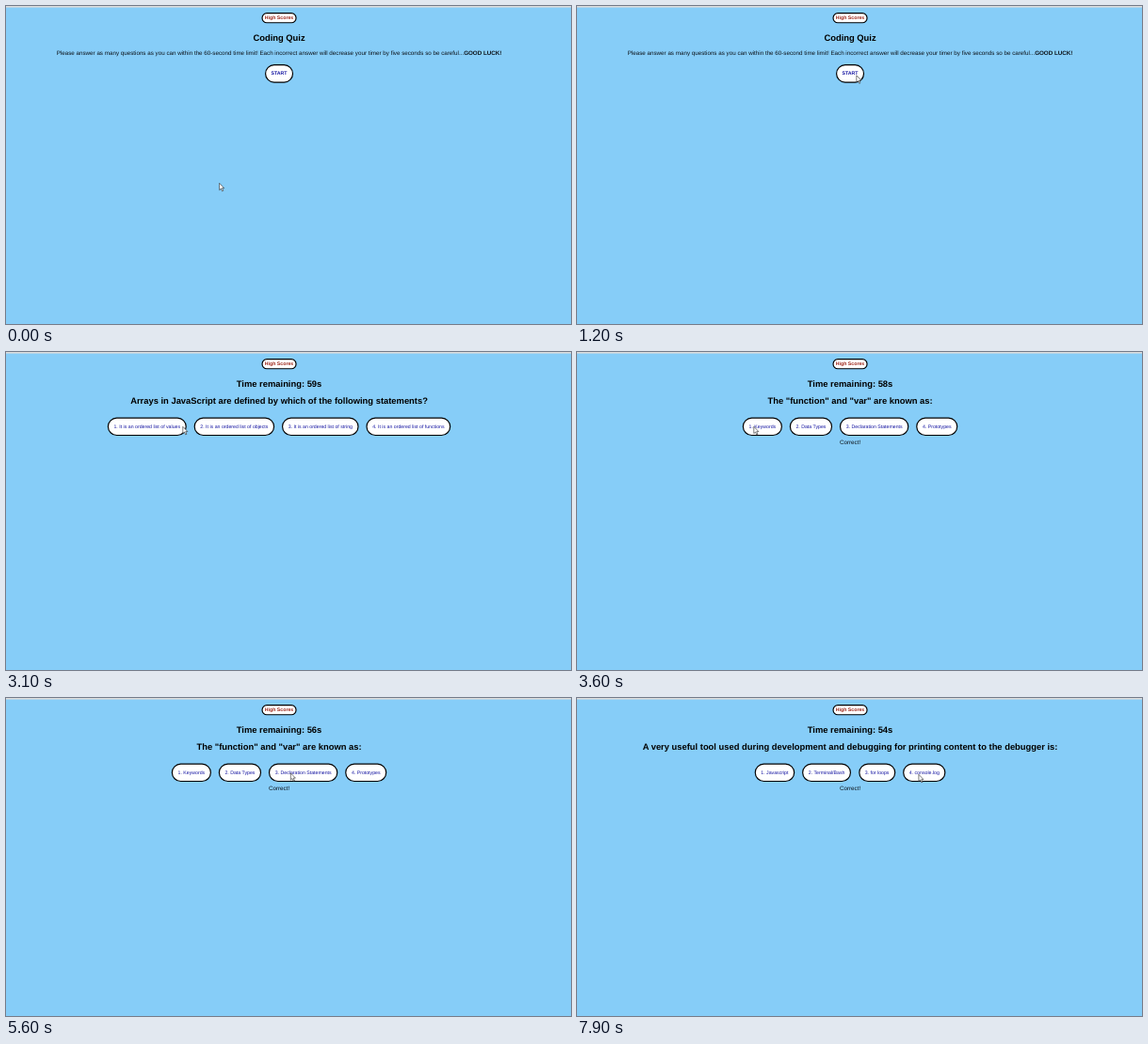
Animation, 600 px wide and 338 px high, one loop 8 s. Source, as an HTML page:

```html
<!DOCTYPE html>
<html lang="en">
<head>
<meta charset="utf-8">
<title>Coding Quiz</title>
<style>
  html, body { margin: 0; width: 100%; height: 100%; overflow: hidden; background: #86cdf8; }
  #page {
    position: absolute; left: 0; top: 0; width: 1485px; height: 865px;
    transform: scale(.390625); transform-origin: 0 0;
    font: 16px "Liberation Sans", Arial, sans-serif; color: #0c1218;
    text-align: center; text-rendering: geometricPrecision; white-space: nowrap;
  }
  #page > * { position: absolute; left: 0; width: 100%; margin: 0; }
  #bar { top: 0; width: 1536px !important; height: 4px; background: #dcdcdc; }
  h2 { font-size: 24px; line-height: 27px; color: #000; }
  h2, p { text-align: center; }
  p { line-height: 18px; }
  .row { display: flex; justify-content: center; gap: 20.45px; }
  .row span {
    box-sizing: border-box; height: 50px; padding: 0 14px;
    border: 3px solid #000; border-radius: 25px; background: #fff;
    font-size: 13.333px; line-height: 44px; color: #1212a0;
  }
  .row .scores {
    height: 29px; padding: 0 6px; border-radius: 14px;
    line-height: 23px; font-weight: bold; color: #9c2418;
  }
  .row .start { font-weight: bold; }
  #cursor { position: absolute; left: 0; top: 0; width: 7px; height: 10px; overflow: visible; }
</style>
</head>
<body>
<div id="page">
  <div id="bar"></div>
  <div class="row" style="top:18px"><span class="scores">High Scores</span></div>
  <h2 id="title" style="top:73px"></h2>
  <p id="intro" style="top:120px">Please answer as many questions as you can within the 60-second time limit! Each incorrect answer will decrease your timer by five seconds so be careful...<b>GOOD LUCK!</b></p>
  <h2 id="question" style="top:120px"></h2>
  <div id="options" class="row"></div>
  <p id="verdict" style="top:237px">Correct!</p>
</div>
<svg id="cursor"><path d="M.3 .3V7.6L2 6.1L3.2 8.8L4.4 8.3L3.2 5.6H5.4Z" fill="#fff" stroke="#222" stroke-width=".6"/></svg>
<script>
const LOOP = 8000, START = 1300;
const $ = id => document.getElementById(id);

const screens = [
  { at: 0 },
  { at: START, ask: 'Arrays in JavaScript are defined by which of the following statements?',
    options: ['values', 'objects', 'string', 'functions'].map(s => 'It is an ordered list of ' + s) },
  { at: 3400, ask: 'The "function" and "var" are known as:',
    options: ['Keywords', 'Data Types', 'Declaration Statements', 'Prototypes'] },
  { at: 5800, ask: 'Inside which HTML element do we put the JavaScript?',
    options: ['<js>', '<javascript>', '<scripting>', '<script>'] },
  { at: 7900, ask: 'A very useful tool used during development and debugging for printing content to the debugger is:',
    options: ['Javascript', 'Terminal/Bash', 'for loops', 'console.log'] }
];

// Pointer stops: time, x, y
const stops = [
  [0, 226.3, 188], [950, 296.5, 73.5], [2100, 296.5, 73.5], [2900, 187.5, 79],
  [3600, 187.5, 79], [4200, 163, 81], [4500, 164, 81], [4600, 192.3, 80.5],
  [4800, 192.3, 80.5], [5400, 302, 79.5], [5900, 302, 79.5], [6300, 181, 80],
  [6600, 399, 79], [6800, 302, 80], [7000, 302, 80], [7600, 362.6, 81], [LOOP, 362.6, 81]
];

function pointer(t) {
  const i = stops.findIndex(s => s[0] > t);
  const [t0, x0, y0] = stops[i - 1], [t1, x1, y1] = stops[i];
  const u = (t - t0) / (t1 - t0), k = u * u * (3 - 2 * u);
  return [x0 + (x1 - x0) * k, y0 + (y1 - y0) * k];
}

let shown;
function show(screen) {
  if (screen === shown) return;
  shown = screen;
  const intro = !screen.ask;
  $('intro').hidden = !intro;
  $('question').textContent = screen.ask || '';
  $('verdict').hidden = screen.at <= START;
  $('options').style.top = intro ? '159px' : '178px';
  $('options').replaceChildren(...(screen.options || ['START']).map((text, i) => {
    const button = document.createElement('span');
    button.textContent = intro ? text : `${i + 1}. ${text}`;
    if (intro) button.className = 'start';
    return button;
  }));
}

function draw(now) {
  const t = Math.floor(now % LOOP / 100) * 100;
  show(screens.findLast(s => s.at <= t));
  $('title').textContent = t < START ? 'Coding Quiz'
    : `Time remaining: ${60 - Math.floor((t - START) / 1000)}s`;
  const [x, y] = pointer(t);
  $('cursor').style.transform = `translate(${x}px, ${y}px)`;
}

const begin = performance.now();
function frame() {
  draw(performance.now() - begin);
  requestAnimationFrame(frame);
}
frame();
</script>
</body>
</html>
```
